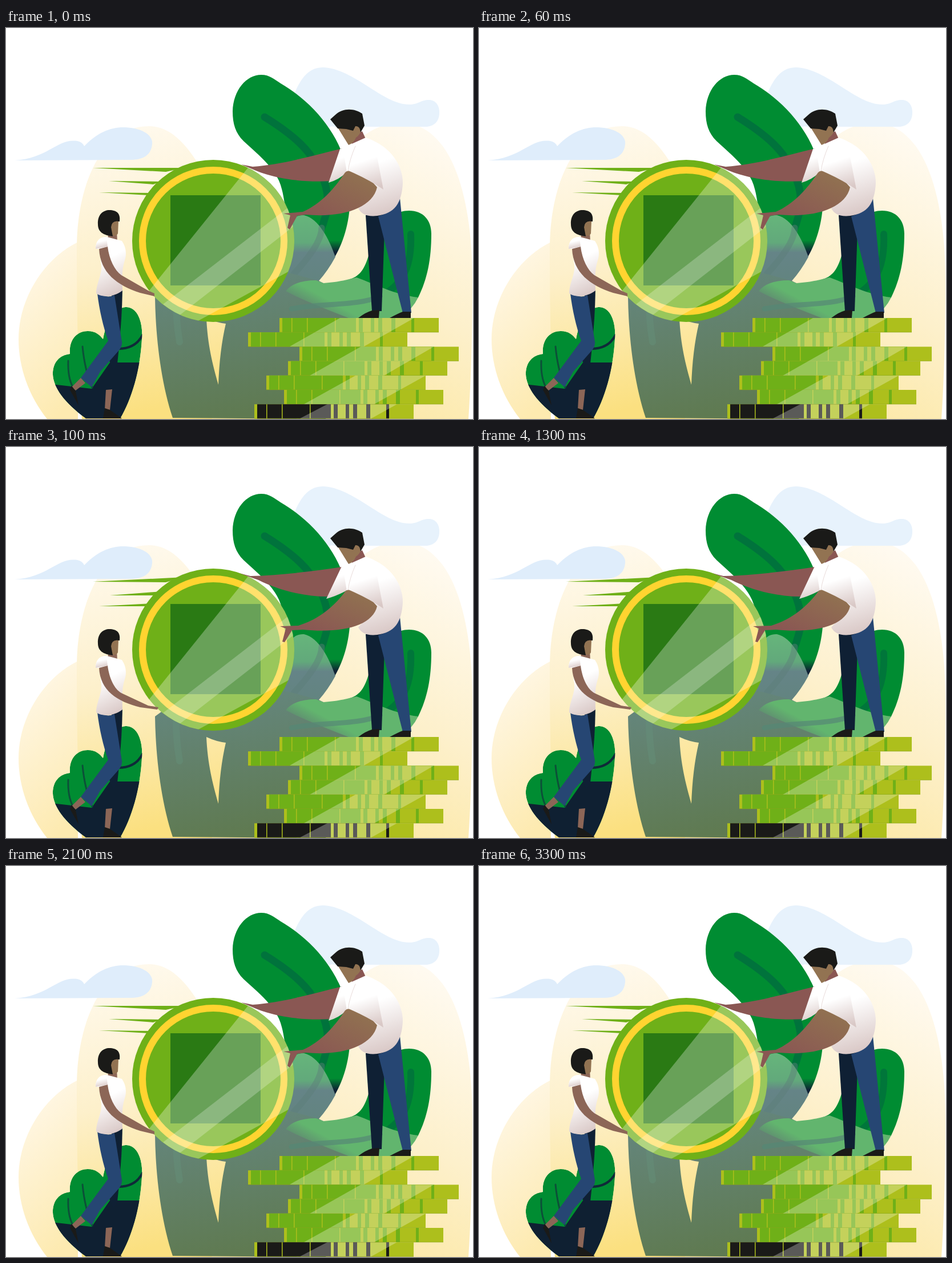
Recreate the animation shown at these times as an HTML page. Size 818 by 685 pixels, loop 4.1 s.

```html
<!DOCTYPE html>
<html lang="en">
<head>
<meta charset="utf-8">
<title>Raising the coin</title>
<style>
html, body { margin: 0; width: 100%; height: 100%; overflow: hidden; background: #fff; }
svg { display: block; width: 100%; height: 100%; }
.line { fill: none; stroke-linecap: round; }
</style>
</head>
<body>
<svg viewBox="0 0 818 685">
<defs>
  <linearGradient id="glow" x1="0" y1="0" x2=".15" y2="1">
    <stop stop-color="#fffaf0"/><stop offset=".5" stop-color="#fdf0cb"/><stop offset="1" stop-color="#fbe080"/>
  </linearGradient>
  <linearGradient id="glowLeft" x1=".3" y1="0" x2=".6" y2="1">
    <stop stop-color="#fff8ea"/><stop offset="1" stop-color="#fdeab0"/>
  </linearGradient>
  <linearGradient id="glowRight" x1=".75" y1="0" x2=".3" y2="1">
    <stop stop-color="#fffaf0"/><stop offset=".5" stop-color="#fdf0cb"/><stop offset="1" stop-color="#fce69a"/>
  </linearGradient>
  <linearGradient id="leaf" gradientUnits="userSpaceOnUse" x1="0" y1="372" x2="0" y2="392">
    <stop stop-color="#008c32"/><stop offset="1" stop-color="#0f2234"/>
  </linearGradient>
  <linearGradient id="dome" gradientUnits="userSpaceOnUse" x1="0" y1="328" x2="0" y2="470">
    <stop stop-color="#66b57b"/><stop offset=".34" stop-color="#62a97b"/>
    <stop offset=".46" stop-color="#658487"/><stop offset="1" stop-color="#61847c"/>
  </linearGradient>
  <linearGradient id="trunk" gradientUnits="userSpaceOnUse" x1="330" y1="460" x2="370" y2="685">
    <stop stop-color="#64857a"/><stop offset="1" stop-color="#5f7a51"/>
  </linearGradient>
  <linearGradient id="sheen" gradientUnits="userSpaceOnUse" x1="530" y1="495" x2="546" y2="466">
    <stop stop-color="#5f8271"/><stop offset="1" stop-color="#62b56e"/>
  </linearGradient>
  <linearGradient id="shirt" x1=".35" y1="0" x2=".6" y2="1">
    <stop offset=".35" stop-color="#fff"/><stop offset="1" stop-color="#d9c8c6"/>
  </linearGradient>
  <linearGradient id="skin" x1="1" y1="0" x2=".35" y2=".8">
    <stop stop-color="#927650"/><stop offset="1" stop-color="#8a5753"/>
  </linearGradient>
  <clipPath id="disc"><circle cx="363" cy="373" r="142"/></clipPath>
  <clipPath id="bushShape"><path id="bushPath" d="M82 607C82 584 95 573 112 571C110 545 125 531 143 531C158 531 164 538 170 545C178 500 198 489 211 489C233 490 240 520 238 545C235 600 220 650 200 684H140C103 657 83 630 82 607Z"/></clipPath>
  <clipPath id="bars"></clipPath>
</defs>

<!-- backdrop -->
<path fill="url(#glowLeft)" d="M72 685C40 645 22 595 22 545C22 475 65 405 126 375V685Z"/>
<path fill="url(#glow)" d="M133 685C125 590 124 480 124 385C124 280 165 172 250 172C305 172 345 240 380 330L480 685Z"/>
<path fill="url(#glowRight)" d="M360 685C480 560 520 172 690 166C790 166 817 320 817 440Q817 580 810 685Z"/>
<path fill="#dfedfb" d="M15 232C75 228 90 193 125 198Q134 200 137 207C160 183 184 173 209 174C242 176 258 189 256 204C254 223 240 231 218 231Z"/>
<path fill="#e7f2fc" d="M505 115C518 85 532 69 555 69C610 71 660 134 706 134C723 134 726 126 741 126C753 126 760 137 759 149C759 164 749 173 735 173H560Z"/>

<!-- foliage -->
<path fill="url(#leaf)" d="M416 198C402 184 397 168 397 146C398 109 421 82 447 82C462 82 470 90 481 97C545 134 603 205 603 292C603 335 593 372 576 401L530 430L470 470L496 325C487 315 488 300 483 282C475 246 437 218 416 198Z"/>
<path class="line" stroke="#00733c" stroke-width="13" d="M453 156C492 180 524 205 539 232C562 267 568 300 560 328Q552 360 533 388"/>
<path fill="#008c32" d="M600 441C640 430 630 385 655 355C670 332 685 320 706 320C731 320 745 337 745 360C745 405 738 440 722 472L690 508H600Z"/>
<path class="line" stroke="#00763a" stroke-width="12" d="M709 361C711 415 697 447 660 468"/>
<path fill="url(#dome)" d="M496 345C500 333 511 327 522 328C548 334 566 370 577 401Q564 425 548 443L556 447L490 500H440Z"/>
<path class="line" stroke="#5c7c79" stroke-width="11" opacity=".45" d="M553 350Q553 378 505 430"/>
<path fill="url(#trunk)" fill-rule="evenodd" d="M261 472L360 400L500 430L548 443L625 508L560 685L292 683C271 620 262 540 261 472ZM351 508Q368 516 385 518Q374 565 372 625C362 590 353 555 351 508Z"/>
<path fill="url(#sheen)" d="M490 461Q505 442 543 442L556 447C585 445 600 440 614 437C650 450 680 467 722 472Q712 493 690 508H600C560 492 520 477 490 461Z"/>
<path class="line" stroke="#568875" stroke-width="9" opacity=".7" d="M655 470C620 487 550 482 500 492"/>
<path class="line" stroke="#64917b" stroke-width="12" opacity=".4" d="M298 480Q298 515 304 550"/>

<g clip-path="url(#bushShape)">
  <use href="#bushPath" fill="#008c32"/>
  <path fill="#0f2032" d="M80 624L150 632L182 586H242V685H80Z"/>
  <g class="line" stroke="#0c5038" stroke-width="3">
    <path d="M134 558Q138 600 151 630M109 583Q108 612 117 629"/>
    <path stroke="#0f2a38" stroke-width="4" d="M239 538Q227 562 196 562"/>
  </g>
</g>

<!-- money -->
<g id="stack"></g>
<g clip-path="url(#bars)" fill="#fff" fill-opacity=".28">
  <path d="M585 508H715L627 558H497ZM622 558H750L662 609H532ZM612 609H735L645 659H522ZM563 659H685L640 684H515Z"/>
</g>

<path id="lines" fill="#6fb018"/>
<g id="coin">
  <circle cx="363" cy="373" r="142" fill="#6fb018"/>
  <circle cx="363" cy="373" r="124" fill="none" stroke="#ffd430" stroke-width="12"/>
  <path fill="#2a7a14" d="M288 293H446V451H288Z"/>
  <g clip-path="url(#disc)" fill="#fff" fill-opacity=".29">
    <path d="M427 241L246 466L260 515H333L496 426L510 400V241Z"/>
    <path fill-opacity=".23" d="M500 310L275 484L303 504L507 345Z"/>
  </g>
</g>

<!-- woman -->
<path fill="#0f2034" d="M185 468L204 458Q203 520 195 588L188 600L180 580Z"/>
<path fill="#264673" d="M160 465Q178 474 190 468L203 550Q204 559 195 568L165 602L150 629L131 613L179 548C169 520 163 490 160 465Z"/>
<path fill="#8c6657" d="M131 613L139 622L122 635L115 629ZM175 634L186 633L182 669L173 668Z"/>
<path fill="#1a1a18" d="M115 627L122 636L127 661Q121 650 112 634ZM173 666L182 669L203 684H170Z"/>
<path fill="#8c6657" d="M180 355H194L195 375L178 370Z"/>
<path fill="#927352" d="M183 344Q187 337 197 338L196 360Q191 368 183 360Z"/>
<path fill="#1a1a18" d="M161 344C160 326 171 319 181 319C194 319 201 325 199 339Q185 336 184 349L187 365C170 363 161 357 161 344Z"/>
<path fill="url(#shirt)" d="M157 387C157 371 167 365 177 366L203 373C210 383 212 396 208 407C202 425 204 440 204 460C190 471 170 473 158 465C158 445 171 429 166 410L164 387Z"/>
<path id="reach" fill="#8c6657"/>
<path fill="url(#shirt)" d="M157 387C157 371 166 365 176 367L178 383Z"/>

<!-- man -->
<path fill="#0f2034" d="M630 328L664 325L658 496H641Z"/>
<path fill="#264673" d="M652 330Q683 320 690 298L710 499H695Z"/>
<path fill="#1a1a18" d="M617 508Q630 498 641 495L654 494L653 508ZM672 508Q687 500 695 497L709 497L709 508Z"/>
<path id="backArm" fill="#8a5753"/>
<path fill="#8a5753" d="M608 188L624 181L630 194L604 213Z"/>
<path fill="#fff" d="M569 172L584 174L603 206L588 209Z"/>
<path fill="#927352" d="M582 176L612 167L622 176Q622 186 613 192Q609 202 600 205Z"/>
<path fill="#1a1a18" d="M568 160L577 152C591 139 611 141 624 150L628 171L621 183Q620 171 612 172L608 180L596 177L581 176Z"/>
<path id="sleeve" fill="url(#shirt)"/>
<path fill="url(#shirt)" d="M590 210L630 192C672 206 695 238 695 272C693 307 681 325 650 329C631 331 622 325 617 316L640 290L597 252Z"/>
<path id="frontArm" fill="url(#skin)"/>
<path fill="url(#shirt)" d="M600 250L612 205L650 225L661 283Q635 265 600 250Z"/>
<path class="line" stroke="#e9dcda" stroke-width="1" d="M612 207Q602 230 599 250"/>
</svg>
<script>
const $ = id => document.getElementById(id);

// Each entry holds the lowered and the raised pose.
const poses = {
  lines: [
    'M152 245L312 245L280 252ZM180 268L272 269L258 274ZM163 288L256 289L250 293Z',
    'M152 236L312 228L280 237ZM182 260L272 253L258 260ZM163 279L256 274L250 279Z'
  ],
  reach: [
    'M163 387L178 383C181 406 190 424 202 433L249 460L260 465V470L235 464C195 451 165 429 163 387Z',
    'M163 387L178 383C181 406 190 424 202 431L249 453L267 456L265 460L235 456C195 446 165 427 163 387Z'
  ],
  backArm: [
    'M412 239L432 243C485 239 535 224 589 211L572 268C523 271 475 265 438 250Z',
    'M408 221L428 226C480 225 535 218 589 210L567 262C523 263 475 250 442 233Z'
  ],
  sleeve: [
    'M585 212L612 205L599 250Q586 265 565 271Z',
    'M588 209L612 205L599 250Q582 260 561 266Z'
  ],
  frontArm: [
    'M486 325L520 322C552 308 575 281 592 256Q596 248 606 251Q636 260 650 279C642 315 590 333 525 327L510 329L497 353L493 350L498 328Z',
    'M480 314L512 313C550 301 575 278 592 256Q596 248 606 251Q636 260 650 279C642 313 590 327 520 320L501 321L488 342L484 341L490 318Z'
  ]
};

function buildStack() {
  const rect = (x, y, w, fill) => `<rect x="${x}" y="${y}" width="${w}" height="25" fill="${fill}"/>`;
  const stripes = [[21, 1.5], [48, 1.5], [97, 1.5], [134, 5], [146, 14], [166, 7], [180, 16], [203, 28]];
  const lime = '#adbf1c';
  [479, 424, 514, 494, 456, 487, 435].forEach((x, row) => {
    const y = 508 + row * 25.2, dark = row === 6;
    $('stack').innerHTML += rect(x, y, 279, lime)
      + rect(x + 5, y, 231, dark ? '#1a1a18' : '#6fb018')
      + stripes.map(([dx, w]) => rect(x + dx, y, w, lime)).join('')
      + `<path d="M${x} ${y + 25}h279" stroke="#829e18" stroke-width=".6"/>`;
    $('bars').innerHTML += rect(x, y, 279, '#000');
  });
}

let shown = -1;
function draw(now) {
  const t = now % 4100;
  const raised = t >= 100 && t < 2100 ? 1 : 0;
  if (raised !== shown) {
    shown = raised;
    for (const id in poses) $(id).setAttribute('d', poses[id][raised]);
    $('coin').setAttribute('transform', `translate(0 ${-18 * raised})`);
  }
  requestAnimationFrame(draw);
}

buildStack();
draw(0);
</script>
</body>
</html>
```
